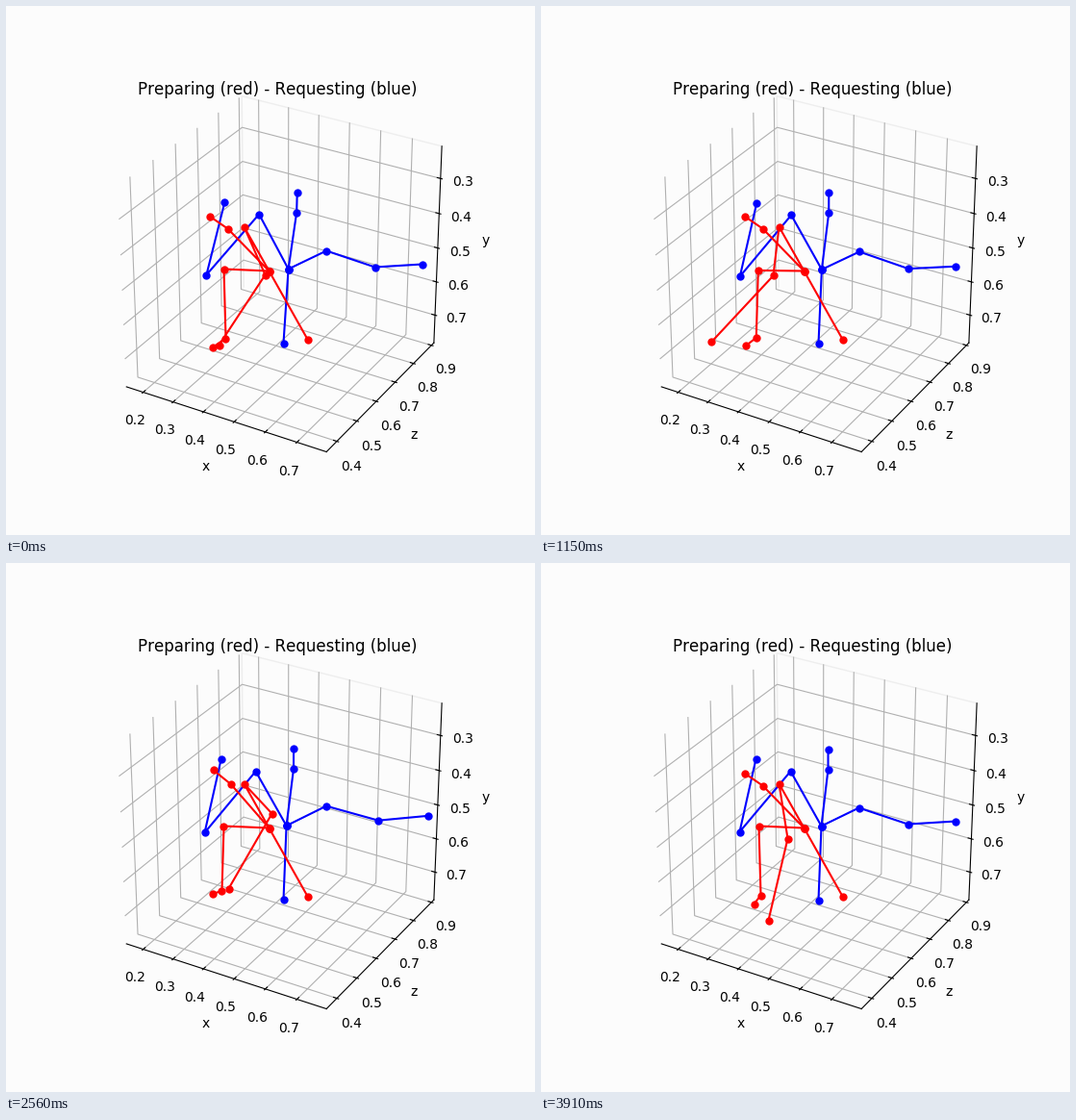
Write a matplotlib script that moves like this. It is 550 px wide and 550 px high and loops after 3.94 s.

```python
import numpy as np
import matplotlib.pyplot as plt
from matplotlib.animation import FuncAnimation
from matplotlib.collections import LineCollection

SIZE, LOOP, STEP = 550, 3940, 10
HALF = 0.5 + 1 / 48          # panes reach slightly past the data cube
TICK_GAP, LABEL_GAP = 0.0752, 0.1635

plt.rcParams["font.family"] = "DejaVu Sans"
plt.rcParams["text.kerning_factor"] = 6
fig = plt.figure(figsize=(5.5, 5.5), dpi=100, facecolor="#fcfcfc")
ax = fig.add_axes([0, 0, 1, 1])
ax.set(xlim=(0, SIZE), ylim=(SIZE, 0))
ax.axis("off")


def project(x, y, z, elev=np.radians(30), azim=np.radians(-60)):
    """Perspective view of the unit cube, in pixels from the top left."""
    ce, se, ca, sa = np.cos(elev), np.sin(elev), np.cos(azim), np.sin(azim)
    right = -sa * x + ca * y
    up = -se * ca * x - se * sa * y + ce * z
    depth = 10 - (ce * ca * x + ce * sa * y + se * z)
    return 287.64 + 2304 * right / depth, 272.03 - 2289.2 * up / depth


def add_lines(paths, color, width=0.8):
    ax.add_collection(LineCollection(
        [[project(*p) for p in path] for path in paths],
        colors=color, linewidths=width, capstyle="projecting"))


def add_text(point, text, va, size=10):
    ax.text(*point, text, ha="center", va=va, fontsize=size)


def draw_box():
    h, g = HALF, HALF + TICK_GAP
    out, inside = h + 1 / 120, h - 1 / 60
    grid, ticks = [], []
    for i in range(6):
        x = -0.430 + 0.1606 * i
        grid.append([(x, -h, -h), (x, h, -h), (x, h, h)])
        ticks.append([(x, -out, -h), (x, -inside, -h)])
        add_text(project(x, -g, -g), f"{0.2 + i / 10:.1f}", "top")

        y = -0.427 + 0.1844 * i
        grid.append([(h, y, -h), (-h, y, -h), (-h, y, h)])
        ticks.append([(out, y, -h), (inside, y, -h)])
        add_text(project(g, y, -g), f"{0.4 + i / 10:.1f}", "top")
    for i in range(5):
        z = 0.357 - 0.1812 * i
        grid.append([(h, h, z), (-h, h, z), (-h, -h, z)])
        ticks.append([(out, h, z), (inside, h, z)])
        add_text(project(g, g, z), f"{0.3 + i / 10:.1f}", "top")

    add_lines([[(h, h, h), (-h, h, h), (-h, h, -h)]], "#eeeeee", 1)
    add_lines(grid, "#b0b0b0")
    add_lines([[(-h, -h, -h), (h, -h, -h)], [(h, -h, -h), (h, h, -h)],
               [(h, h, -h), (h, h, h)]] + ticks, "black")

    far = HALF + LABEL_GAP
    add_text(project(0, -far, -far), "x", "center")
    add_text(project(far, 0, -far), "z", "center")
    add_text(project(far, far, 0), "y", "center")
    add_text((281.9, 91.6), "Preparing (red) - Requesting (blue)", "baseline", 12)


HEAD, NOSE, NECK, SHOULDER, ELBOW, HAND, SHOULDER2, ELBOW2, HAND2, HIP = range(10)
LIMBS = [[HEAD, NOSE, NECK, HIP], [NECK, SHOULDER, ELBOW, HAND],
         [NECK, SHOULDER2, ELBOW2, HAND2]]

# resting positions, in joint order
BLUE_REST = np.array([(298, 193), (298, 214), (291, 273), (259, 216), (206, 279),
                      (223, 203), (330, 254), (381, 271), (430, 268), (288, 350)], float)
RED_REST = np.array([(211, 218), (230, 231), (273, 275), (247, 229), (256, 286),
                     (236, 371), (226, 273), (228, 345), (221, 354), (313, 346)], float)

# the busy red arm: time, elbow x, y, hand x, y
RED_ARM = np.array([(0, 269, 279, 221, 352), (240, 241, 276, 174, 342),
                    (990, 241, 276, 175, 344), (1480, 241, 288, 180, 359),
                    (2080, 246, 268, 188, 325), (2560, 276, 260, 231, 338),
                    (2950, 242, 285, 172, 365), (3340, 254, 299, 221, 383),
                    (3910, 256, 286, 236, 371)]).T


def pulse(t, centre, width, power=2):
    return np.exp(-(abs(t - centre) / width) ** power)


def blue_pose(t):
    joints = BLUE_REST.copy()
    x, y = BLUE_REST.T
    lean = np.exp(-t / 700)
    sag = np.sin(np.pi * t / LOOP)
    reach = pulse(t, 2650, 250)
    arm = np.maximum(x - x[NECK], 0)
    joints[:, 0] += 0.027 * (y[HIP] - y) * lean + 0.07 * arm * reach
    joints[:, 1] += ((0.6 + 0.016 * abs(x - x[NECK])) * sag
                     - (1 + 0.06 * arm) * reach)
    return joints


def red_pose(t):
    joints = RED_REST.copy()
    swing, look, drop = pulse(t, 1480, 250), pulse(t, 2320, 350, 4), pulse(t, 3340, 200)
    joints[HEAD] += np.array([5, -4]) * look
    joints[NOSE] += np.array([4, -2]) * look
    joints[SHOULDER2] += np.array([-4, 8]) * swing
    joints[ELBOW2] += np.array([-27, -4]) * swing + np.array([-5, -6]) * look
    joints[HAND2] += (np.array([-49, -6]) * swing + np.array([-8, -13]) * look
                      + np.array([6, 8]) * drop - np.array([6, 0]) * np.exp(-t / 300))
    times, *tracks = RED_ARM
    joints[[ELBOW, HAND]] = np.reshape([np.interp(t, times, v) for v in tracks], (2, 2))
    return joints


def make_limbs(color, zorder):
    return [ax.plot([], [], "-o", color=color, lw=1.5, ms=20 ** 0.5,
                    markeredgewidth=1.5, zorder=zorder)[0] for _ in LIMBS]


def place(lines, joints):
    for line, limb in zip(lines, LIMBS):
        line.set_data(*(joints[limb] + 0.5).T)


# short bursts of movement first, then a steady 30 ms beat
CHANGES = np.concatenate(
    [np.arange(0, 241, 30)]
    + [start + 30 * np.arange(4) for start in range(400, 1151, 250)]
    + [np.arange(1330, LOOP, 30)])

draw_box()
blue_lines = make_limbs("#0000ff", 4)
red_lines = make_limbs("#ff0000", 5)


def update(frame):
    t = CHANGES[np.searchsorted(CHANGES, frame * STEP, side="right") - 1]
    place(blue_lines, blue_pose(t))
    place(red_lines, red_pose(t))
    return blue_lines + red_lines


animation = FuncAnimation(fig, update, frames=LOOP // STEP, interval=STEP,
                          init_func=lambda: update(0), repeat=True, repeat_delay=0)
plt.show()
```
